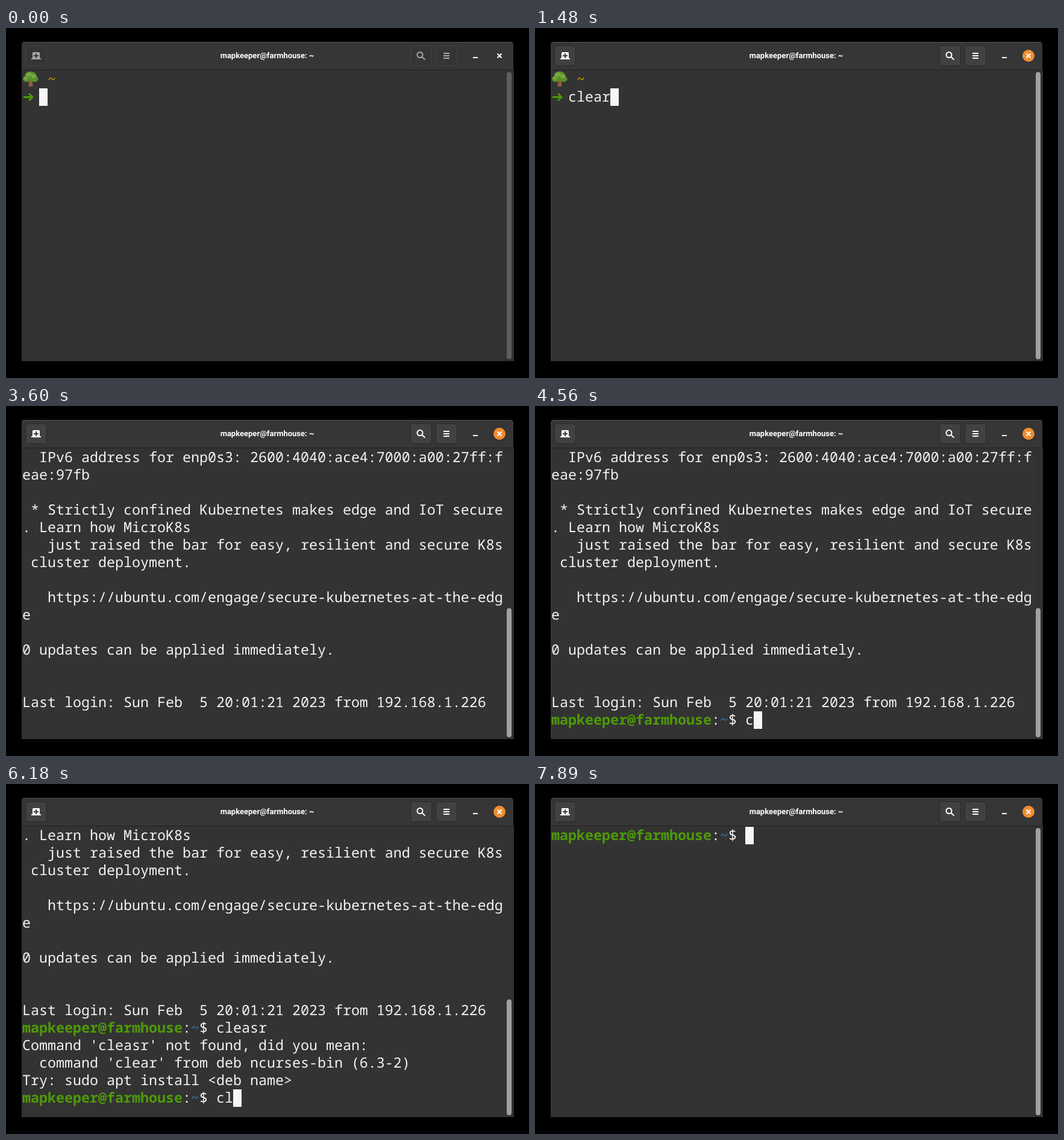
Animation of 868x580 px, one loop 8 s. Source, as an HTML page:

```html
<!DOCTYPE html>
<html lang="en">
<head>
<meta charset="utf-8">
<title>Terminal session</title>
<style>
  html, body { margin: 0; width: 100%; height: 100%; overflow: hidden; background: #000; }
  svg { display: block; }
  text { white-space: pre; text-rendering: geometricPrecision; }
  .title { font: 700 13px Roboto, sans-serif; fill: #fff; text-anchor: middle; }
  #rows { font: 23.3333px "Noto Sans Mono", monospace; fill: #f3f3f3; font-variant-ligatures: none; }
  .user { font-weight: 700; fill: #4e9a06; }
  .path { font-weight: 700; fill: #3465a4; }
  .gold { fill: #c4a000; }
</style>
</head>
<body>
<svg width="868" height="580" viewBox="0 0 868 580">
  <path d="M26 552V28q0-5 5-5H837q5 0 5 5V69h1V552z" fill="#333"/>
  <path d="M26 69V28q0-5 5-5H837q5 0 5 5V69z" fill="#363636"/>
  <path d="M29 23.5H839" stroke="#505050"/>
  <path d="M26 69.5H842" stroke="#222"/>
  <path d="M829 70H843V552H829z" fill="#313131"/>

  <g id="buttons" stroke-width="1"></g>
  <g id="icons">
    <path d="M45.500 40h9q1.500 0 1.500 1.500V50h2v2H42v-2h2v-8.500q0-1.500 1.500-1.500z"/>
    <path d="M50 42v8M46 46h8" stroke="#383838" stroke-width="2"/>
    <g id="lens" fill="none" stroke-width="2">
      <circle cx="687" cy="44.500" r="4.500"/>
      <path d="M690.500 48l5 4.500"/>
    </g>
    <path d="M726 41h10v2h-10zM726 45h10v2h-10zM726 49h10v2h-10z"/>
  </g>
  <path d="M775 48h8v2h-8z" fill="#fff"/>
  <circle id="close" cx="819" cy="46" r="10" fill="#f08d30"/>
  <path d="M815.500 42.500l7 7M822.500 42.500l-7 7" stroke="#fff" stroke-width="2"/>
  <text class="title" x="433.500" y="50">mapkeeper@farmhouse: ~</text>

  <g id="prompt">
    <path d="M38.500 84h5l1 13h-7z" fill="#89603c"/>
    <path d="M41 91l-6-6M41 90l6-5" stroke="#89603c" stroke-width="2"/>
    <g fill="#5b8f2f">
      <ellipse cx="41" cy="79.500" rx="9.500" ry="7.500"/>
      <ellipse cx="34" cy="84.500" rx="6" ry="5"/>
      <ellipse cx="47.500" cy="84.500" rx="6" ry="5"/>
    </g>
    <g fill="#75aa3f">
      <ellipse cx="38" cy="77" rx="5" ry="3.500"/>
      <ellipse cx="46" cy="80" rx="4" ry="3"/>
      <ellipse cx="33" cy="83" rx="3.500" ry="2.500"/>
    </g>
    <path d="M29 114.500H44M38 108.500l6 6l-6 6" fill="none" stroke="#4e9a06" stroke-width="2.800"/>
  </g>
  <g id="rows"></g>
  <rect id="cursor"/>
  <rect id="thumb" x="831" width="8" rx="4"/>
</svg>
<script>
const LOOP = 8000, COLS = 57, ROWS = 16, CELL = 14, LINE = 29, LEFT = 27, TOP = 71;
const USER = 'mapkeeper@farmhouse';
const OFF = [[1320, 1480], [2700, 2950], [3520, 4070], [7320, 7890]];
const $ = id => document.getElementById(id);

function add(parent, tag, attrs = {}) {
  const el = document.createElementNS('http://www.w3.org/2000/svg', tag);
  set(el, attrs);
  return parent.appendChild(el);
}

function set(el, attrs) {
  for (const key in attrs) el.setAttribute(key, attrs[key]);
}

const wrap = line => line.match(new RegExp(`.{1,${COLS}}`, 'g')) || [''];
const plain = line => [[line, '']];

const welcome = `Welcome to Ubuntu 22.04.1 LTS (GNU/Linux 5.15.0-58-generic x86_64)

 * Documentation:  https://help.ubuntu.com
 * Management:     https://landscape.canonical.com
 * Support:        https://ubuntu.com/advantage

  System information as of Sun Feb  5 08:01:37 PM UTC 2023

  System load:             0.0
  Usage of /:              46.1% of 11.21GB
  Memory usage:            11%
  Swap usage:              0%
  Temperature:             41.0 C
  Processes:               108
  Users logged in:         1
  IPv4 address for enp0s3: 192.168.1.240
  IPv6 address for enp0s3: 2600:4040:ace4:7000:a00:27ff:feae:97fb

 * Strictly confined Kubernetes makes edge and IoT secure. Learn how MicroK8s
   just raised the bar for easy, resilient and secure K8s cluster deployment.

   https://ubuntu.com/engage/secure-kubernetes-at-the-edge

0 updates can be applied immediately.

`.split('\n').flatMap(wrap).map(plain);

const login = plain('Last login: Sun Feb  5 20:01:21 2023 from 192.168.1.226');
const missing = [
  "Command 'cleasr' not found, did you mean:",
  "  command 'clear' from deb ncurses-bin (6.3-2)",
  'Try: sudo apt install <deb name>'
].map(plain);

const remote = text => [[USER, 'user'], [':', ''], ['~', 'path'], ['$ ' + text, '']];
const typed = (word, times, t) => word.slice(0, times.filter(at => t >= at).length);

// All lines in the buffer; the cursor follows the last one.
function buffer(t) {
  if (t >= 6660) return [remote('')];
  const command = t < 1480 ? '' : t < 2050 ? 'clear' : 'ssh ' + USER;
  const lines = [[['   ~', 'gold']], plain('  ' + command)];
  if (t < 2950) return lines;
  if (t < 3440) return [...lines, plain('')];
  lines.push(...welcome);
  if (t < 3600) return [...lines, plain('')];
  lines.push(login);
  if (t < 3910) return [...lines, plain('')];
  lines.push(remote(typed('cleasr', [4560, 4720, 4880, 4960, 5040, 5120], t)));
  if (t < 5280) return lines;
  if (t < 5360) return [...lines, plain('')];
  return [...lines, ...missing, remote(typed('clear', [5850, 6180, 6260, 6420, 6570], t))];
}

const rows = Array.from({ length: ROWS }, (_, i) =>
  add($('rows'), 'text', { x: LEFT, y: TOP + 22 + i * LINE }));
const buttons = [32, 671, 713].map(x =>
  add($('buttons'), 'rect', { x: x + 0.5, y: 29.5, width: 35, height: 33, rx: 4 }));

let shown = '';
function drawText(lines) {
  const key = JSON.stringify(lines);
  if (key === shown) return;
  shown = key;
  rows.forEach((row, i) => {
    row.textContent = '';
    for (const [text, kind] of lines[i] || []) {
      add(row, 'tspan', { class: kind }).textContent = text;
    }
  });
}

function drawCursor(t, line, row) {
  const col = line.reduce((sum, [text]) => sum + text.length, 0);
  const hollow = t >= 150 && t < 720;
  const grow = hollow ? 0.5 : 0;
  set($('cursor'), {
    x: LEFT + col * CELL - grow, y: TOP + row * LINE - grow,
    width: CELL + 2 * grow, height: LINE + 2 * grow,
    fill: hollow ? 'none' : '#f6f6f6', stroke: hollow ? '#f6f6f6' : 'none',
    visibility: OFF.some(([from, to]) => t >= from && t < to) ? 'hidden' : 'visible'
  });
}

function drawFocus(t) {
  const k = Math.min(1, Math.max(0, (t - 650) / 300));
  const grey = (a, b) => {
    const v = Math.round(a + (b - a) * k);
    return `rgb(${v},${v},${v})`;
  };
  const icon = grey(168, 255);
  buttons.forEach(b => set(b, { fill: grey(53, 65), stroke: grey(66, 40) }));
  set($('icons'), { fill: icon });
  set($('lens'), { stroke: icon });
  set($('close'), { opacity: k });
  set($('thumb'), { fill: grey(94, 161) });
}

function draw(t) {
  const lines = buffer(t);
  const top = Math.max(0, lines.length - ROWS);
  drawText(lines.slice(top));
  drawCursor(t, lines[lines.length - 1], lines.length - 1 - top);
  drawFocus(t);
  const height = top ? Math.round(7690 / lines.length) : 476;
  set($('thumb'), { y: 549 - height, height });
  set($('prompt'), { visibility: t < 3440 ? 'visible' : 'hidden' });
}

const start = performance.now();
function tick() {
  draw((performance.now() - start) % LOOP);
  requestAnimationFrame(tick);
}
tick();
</script>
</body>
</html>
```
